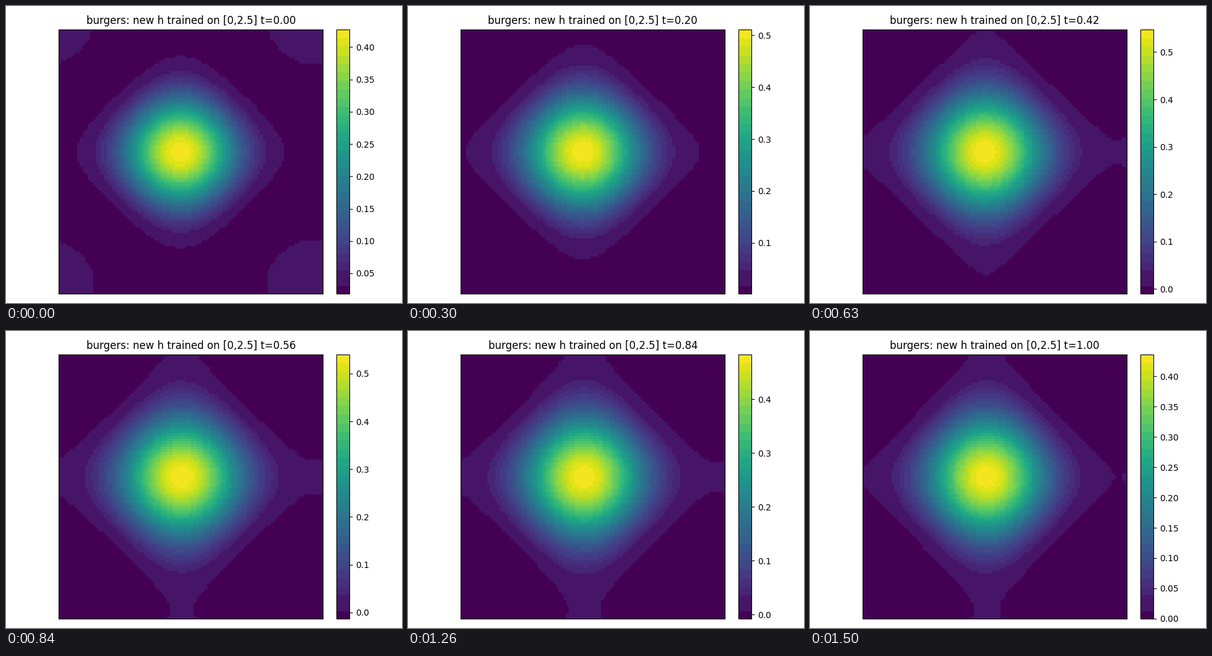
Write a matplotlib script that moves like this. It is 640 px wide and 480 px high and loops after 1530 ms.

```python
import numpy as np
import matplotlib.pyplot as plt
from matplotlib.animation import FuncAnimation
from matplotlib.colors import ListedColormap

W, H, DPI = 640, 480, 100
FRAMES, INTERVAL = 51, 30
LEFT, TOP, SIDE = 85.2, 37.8, 427.2   # heat map square, in pixels from the top left
CELLS = 100
POWER = 2.65


def swing(t, start, end, *waves):
    """Straight line from start to end plus sine waves that vanish at both ends."""
    line = start + (end - start) * t
    return line + sum(a * np.sin(n * np.pi * t) for n, a in enumerate(waves, 1))


def limits(t):
    low = swing(t, 0.0184, -0.0002, -0.0215)
    high = swing(t, 0.4273, 0.4363, 0.1165, 0.0121, 0.0025)
    return low, high


def banded_viridis():
    """Viridis cut into flat bands, wider at the dark end."""
    edges = np.concatenate([[-0.02, 0.027], np.linspace(0.087, 1, 29)])
    middles = (edges[:-1] + edges[1:]) / 2
    samples = (np.arange(512) + 0.5) / 512
    band = np.digitize(samples, edges[1:-1])
    return ListedColormap(plt.get_cmap("viridis")(middles[band]))


def field(t):
    """Periodic bump: a power law over the sum of two cosines, plus fading corners."""
    pos = (np.arange(CELLS) + 0.5) / CELLS * SIDE
    cos_x = np.cos(2 * np.pi * (pos + LEFT - 281.7 - 3.5 * t) / SIDE)[None, :]
    cos_y = np.cos(2 * np.pi * (pos + TOP - 236.3) / SIDE)[:, None]
    s = cos_x + cos_y + (0.05 * t - 0.038) * (cos_x - cos_y)
    foot = -0.3 - 1.35 * t + 0.93 * t ** 2
    bump = np.clip((s - foot) / (2 - foot), 0, None) ** POWER
    corner = max(0, 0.042 - 0.115 * t) * np.clip(-s - 0.5, 0, None) / 1.5
    low, high = limits(t)
    return low + (high - low) * (bump + corner)


def place(x, y, w, h):
    return fig.add_axes([x / W, 1 - (y + h) / H, w / W, h / H])


fig = plt.figure(figsize=(W / DPI, H / DPI), dpi=DPI, facecolor="white")
ax = place(LEFT, TOP, SIDE, SIDE)
cax = place(LEFT + SIDE * 1.05, TOP, SIDE * 0.05, SIDE)
ax.set_xticks([])
ax.set_yticks([])
image = ax.imshow(field(0), cmap=banded_viridis(), interpolation="nearest",
                  aspect="auto")
bar = fig.colorbar(image, cax=cax)
title = ax.set_title("")


def update(i):
    t = i / (FRAMES - 1)
    image.set_data(field(t))
    image.set_clim(*limits(t))
    title.set_text(f"burgers: new h trained on [0,2.5] t={t:.2f}")
    return image, title


anim = FuncAnimation(fig, update, frames=FRAMES, interval=INTERVAL, repeat=True)
plt.show()
```
